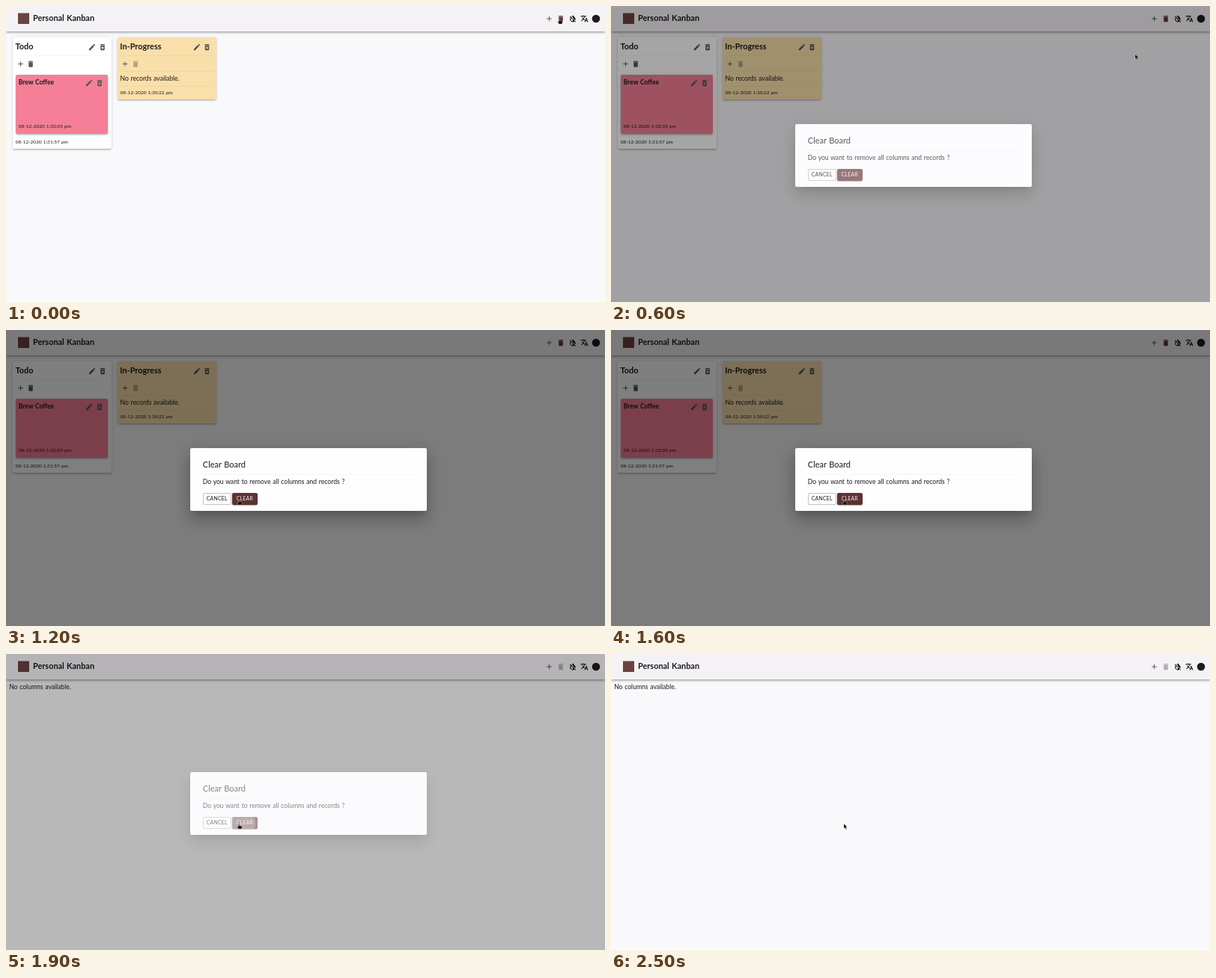
An HTML page that plays this animation: 800 px wide and 396 px high, repeating every 2.6 s.

```html
<!DOCTYPE html>
<html lang="en">
<head>
<meta charset="utf-8">
<title>Personal Kanban</title>
<style>
  html, body { margin: 0; width: 100%; height: 100%; overflow: hidden; }
  body { position: relative; background: #f9f8fa; font-family: Nunito, Lato, sans-serif; }
  div, svg { position: absolute; box-sizing: border-box; }
  .layer { left: 0; top: 0; width: 800px; height: 396px; }
  .anim { animation: 2600ms linear infinite paused; }

  text { fill: #1c1b1d; font-size: 8.6px; word-spacing: .06em; }
  .head { font-size: 10.9px; font-weight: 700; }
  .card-title { font-size: 8.5px; font-weight: 700; }
  .date { font-size: 6.5px; }
  .btn { font-size: 6.9px; letter-spacing: .03em; }
  .rule { stroke: #000; stroke-opacity: .08; stroke-width: .6; }
  .ink { fill: #555; }
  .off { fill: #000; fill-opacity: .28; }

  #bar {
    left: 0; top: 0; width: 800px; height: 34px; background: #f4f2f4;
    box-shadow: 0 1px 2px -.5px #0003, 0 2px 3px #00000024, 0 .5px 5px #0000001f;
  }
  .paper {
    border-radius: 2px;
    box-shadow: 0 1.5px 1.5px -1px #0003, 0 1.5px 2px #00000024, 0 .5px 4px #0000001f;
  }
  #todo { left: 8.5px; top: 42px; width: 132px; height: 149px; background: #fff; }
  #doing { left: 148.5px; top: 42px; width: 132px; height: 83px; background: #f9dfaa; }
  #task { left: 12.5px; top: 91.5px; width: 123.5px; height: 79px; background: #f47f97; }

  #shade { background: #00000080; }
  #dialog {
    left: 246px; top: 157.5px; width: 315.5px; height: 84px;
    border-radius: 2px; background: #fefdff;
    box-shadow: 0 6px 8px -4px #0003, 0 13px 20px 2px #00000024, 0 5px 24px 4px #0000001f;
  }
  #cancel, #clear { top: 217.5px; height: 16px; border-radius: 2px; }
  #cancel { left: 262.5px; width: 38px; border: .6px solid #0000003b; }
  #clear {
    left: 302px; width: 33.5px; overflow: hidden;
    box-shadow: 0 1.5px .5px -1px #0003, 0 1px 1px #00000024, 0 .5px 2.5px #0000001f;
    animation-name: hover;
  }
  #ripple {
    left: -23px; top: -23px; width: 64px; height: 64px;
    border-radius: 50%; background: #fff; animation-name: ripple;
  }
  #modal { animation-name: fade; }
  #board { animation-name: before; }
  #empty { animation-name: after; }
  #pointer { left: 0; top: 0; width: 12px; height: 14px; overflow: visible; animation-name: move; }
  #hand { animation-name: hand; }
  #arrow { animation-name: arrow; }

  @keyframes fade {
    0% { opacity: 0; }
    19.154% { opacity: 0; animation-timing-function: cubic-bezier(.4, 0, .2, 1); }
    27.808% { opacity: 1; }
    70.5% { opacity: 1; animation-timing-function: cubic-bezier(.4, 0, .2, 1); }
    78%, 100% { opacity: 0; }
  }
  @keyframes hover {
    0%, 33% { background: #6f4543; }
    42.3%, 100% { background: #5c3133; }
  }
  @keyframes ripple {
    0%, 63.8% {
      transform: scale(0); opacity: .1;
      animation-timing-function: cubic-bezier(.4, 0, .2, 1);
    }
    85%, 100% { transform: scale(1); opacity: .3; }
  }
  @keyframes move {
    0%, 19.231% { transform: translate(739px, 17px); }
    23.077% { transform: translate(700px, 64.5px); }
    26.923% {
      transform: translate(507px, 201px);
      animation-timing-function: cubic-bezier(.15, .7, .3, 1);
    }
    42.308%, 100% { transform: translate(311px, 227px); }
  }
  /* hard switches sit halfway between two ticks */
  @keyframes before {
    0%, 71.15% { opacity: 1; }
    71.16%, 100% { opacity: 0; }
  }
  @keyframes after {
    0%, 71.15% { opacity: 0; }
    71.16%, 100% { opacity: 1; }
  }
  @keyframes hand {
    0%, 21.15% { opacity: 1; }
    21.16%, 25% { opacity: 0; }
    25.01%, 75% { opacity: 1; }
    75.01%, 100% { opacity: 0; }
  }
  @keyframes arrow {
    0%, 21.15% { opacity: 0; }
    21.16%, 25% { opacity: 1; }
    25.01%, 75% { opacity: 0; }
    75.01%, 100% { opacity: 1; }
  }
</style>
</head>
<body>
<svg width="0" height="0">
  <symbol id="add" viewBox="0 0 24 24"><path d="M19 13h-6v6h-2v-6H5v-2h6V5h2v6h6z"/></symbol>
  <symbol id="edit" viewBox="0 0 24 24"><path d="M3 17.25V21h3.75L17.81 9.94l-3.75-3.75zM20.71 7.04a1 1 0 0 0 0-1.41l-2.34-2.34a1 1 0 0 0-1.41 0l-1.83 1.83 3.75 3.75z"/></symbol>
  <symbol id="bin" viewBox="0 0 24 24"><path d="M6 19a2 2 0 0 0 2 2h8a2 2 0 0 0 2-2V7H6zM19 4h-3.5l-1-1h-5l-1 1H5v2h14z"/></symbol>
  <symbol id="drop-bin" viewBox="0 0 24 24"><path fill-rule="evenodd" d="M6 19a2 2 0 0 0 2 2h8a2 2 0 0 0 2-2V7H6zM8.46 11.88l1.41-1.41L12 12.59l2.12-2.12 1.41 1.41L13.41 14l2.12 2.12-1.41 1.41L12 15.41l-2.12 2.12-1.41-1.41L10.59 14zM15.5 4l-1-1h-5l-1 1H5v2h14V4z"/></symbol>
  <symbol id="tint" viewBox="0 0 24 24"><path d="M12 5.1v4.58l7.25 7.26a8 8 0 0 0-1.6-9.01L12 2.27l-3.7 3.7 1.41 1.41zM4.27 4.5 3 5.77l2.78 2.78A8 8 0 0 0 17.03 19.8l2.7 2.7L21 21.23zM12 19.59a6 6 0 0 1-4.79-9.6L12 14.77z"/></symbol>
  <symbol id="lang" viewBox="0 0 24 24"><path d="M12.87 15.07l-2.54-2.51A17.5 17.5 0 0 0 14.07 6H17V4h-7V2H8v2H1v2h11.17A15.7 15.7 0 0 1 9 11.35 15.5 15.5 0 0 1 6.69 8h-2a17.6 17.6 0 0 0 2.98 4.56l-5.09 5.02L4 19l5-5 3.11 3.11zM18.5 10h-2L12 22h2l1.12-3h4.75L21 22h2zM15.88 17l1.62-4.33L19.12 17z"/></symbol>
</svg>

<div id="bar"></div>
<svg class="layer">
  <rect x="16" y="9.5" width="15" height="14.5" fill="#6b4341"/>
  <text class="head" x="36" y="20.3">Personal Kanban</text>
  <use class="ink" href="#add" x="720" y="11.5" width="11" height="11"/>
  <use href="#tint" x="751.5" y="11.5" width="11" height="11"/>
  <use href="#lang" x="767" y="11.5" width="11" height="11"/>
  <circle cx="788" cy="17" r="5.3" fill="#1b1b1d"/>
</svg>

<div id="board" class="layer anim">
  <div id="todo" class="paper"></div>
  <div id="doing" class="paper"></div>
  <div id="task" class="paper"></div>
  <svg class="layer">
    <use fill="#5f3434" href="#bin" x="735.5" y="11.5" width="11" height="11"/>
    <path class="rule" d="M13 66.3h123M152.500 66.300h123.500M152.500 87.500h123.500M152.500 107.500h123.500"/>

    <text class="head" x="12.5" y="58.3">Todo</text>
    <use class="ink" href="#edit" x="109.500" y="49.500" width="11" height="11"/>
    <use class="ink" href="#drop-bin" x="123.500" y="49.500" width="11" height="11"/>
    <use class="ink" href="#add" x="14" y="72" width="11" height="11"/>
    <use class="ink" href="#bin" x="27.500" y="72" width="11" height="11"/>
    <text class="date" x="12.7" y="184.3">08-12-2020 1:31:57 pm</text>

    <text class="card-title" x="16.8" y="104.5">Brew Coffee</text>
    <use class="ink" href="#edit" x="105.500" y="97.500" width="11" height="11"/>
    <use class="ink" href="#drop-bin" x="119.500" y="97.500" width="11" height="11"/>
    <text class="date" x="16.8" y="162.8">08-12-2020 1:32:05 pm</text>

    <text class="head" x="152.3" y="58.3">In-Progress</text>
    <use class="ink" href="#edit" x="249.500" y="49.500" width="11" height="11"/>
    <use class="ink" href="#drop-bin" x="263" y="49.500" width="11" height="11"/>
    <use class="ink" href="#add" x="153.500" y="72" width="11" height="11"/>
    <use class="off" href="#bin" x="167.500" y="72" width="11" height="11"/>
    <text x="152.5" y="100.3">No records available.</text>
    <text class="date" x="152.5" y="117.8">08-12-2020 1:30:22 pm</text>
  </svg>
</div>

<svg id="empty" class="layer anim">
  <use class="off" href="#bin" x="735.5" y="11.5" width="11" height="11"/>
  <text x="4.2" y="46.8">No columns available.</text>
</svg>

<div id="modal" class="layer anim">
  <div id="shade" class="layer"></div>
  <div id="dialog"></div>
  <div id="cancel"></div>
  <div id="clear" class="anim"><div id="ripple" class="anim"></div></div>
  <svg class="layer">
    <text x="262.8" y="184.3" style="font-size:11px">Clear Board</text>
    <path class="rule" d="M263 193.3h282"/>
    <text x="262.8" y="206.4">Do you want to remove all columns and records ?</text>
    <text class="btn" x="267.800" y="227.800">CANCEL</text>
    <text class="btn" x="307.800" y="227.800" style="fill:#f6eeee">CLEAR</text>
  </svg>
</div>

<svg id="pointer" class="anim" stroke="#fff" stroke-opacity=".7" stroke-width=".5">
  <path id="hand" class="anim" d="M-.6 .5Q0-.3.6.5V2.700L3.700 3.300Q4.300 3.500 4.200 4.200L3.600 7H-.4L-2.300 4.600Q-2.400 3.700-1.500 3.900L-.6 4.600Z"/>
  <path id="arrow" class="anim" d="M0 0V6.500L1.500 5.200 2.600 7.700 3.700 7.200 2.600 4.800H4.600Z"/>
</svg>

<script>
  const LOOP = 2600, TICK = 100;
  const anims = document.getAnimations();
  const start = performance.now();

  function draw() {
    const t = (performance.now() - start) % LOOP;
    const tick = Math.floor(t / TICK) * TICK;
    for (const a of anims) a.currentTime = tick;
    requestAnimationFrame(draw);
  }
  draw();
</script>
</body>
</html>
```
